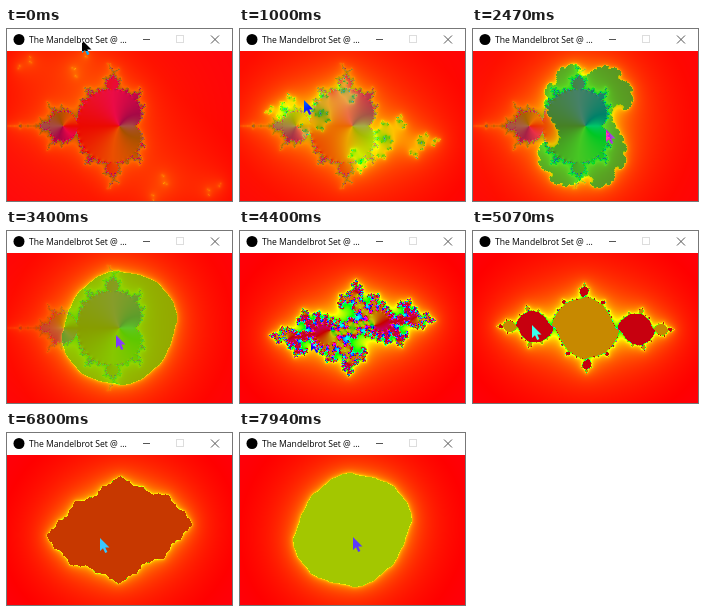
Write an HTML page with a canvas that moves like this. It is 227 px wide and 174 px high and loops after 8000 ms.

```html
<!DOCTYPE html>
<html lang="en">
<head>
<meta charset="utf-8">
<title>Mandelbrot and Julia explorer</title>
<style>
html, body { margin: 0; width: 100%; height: 100%; overflow: hidden; background: #fff; }
canvas { display: block; width: 100%; height: 100%; }
</style>
</head>
<body>
<canvas id="stage" width="227" height="174"></canvas>
<script>
const ctx = document.getElementById('stage').getContext('2d');
const LOOP = 8000, STEPS = 120, STEP = LOOP / STEPS;
const W = 225, H = 150, LEFT = 1, TOP = 23;
const SCALE = W / 4, LIMIT = 50;

// Pointer poses: time, place, and velocity in pixels per step
const POSES = [
  { t: -STEP, x: 90, y: -50, vx: 0, vy: 0 },
  { t: 0, x: 76, y: 12, vx: 0, vy: 25 },
  { t: 540, x: 66, y: 70, vx: 0, vy: 0 },
  { t: 870, x: 66, y: 70, vx: 0, vy: 0 },
  { t: 1670, x: 57, y: 101, vx: 0, vy: 0 },
  { t: 2470, x: 134, y: 101, vx: 1, vy: -3.5 },
  { t: 4400, x: 72, y: 108, vx: -0.5, vy: -4 },
  { t: 5870, x: 48, y: 106, vx: 0, vy: 0 },
  { t: 6800, x: 94, y: 106, vx: 1, vy: 0 },
  { t: 7940, x: 114, y: 105, vx: 2, vy: 0 }
];

const clamp01 = v => Math.max(0, Math.min(1, v));

// Cubic Hermite between neighbouring poses
function pointer(t) {
  let i = 0;
  while (i < POSES.length - 2 && t >= POSES[i + 1].t) i++;
  const a = POSES[i], b = POSES[i + 1], d = b.t - a.t;
  const u = clamp01((t - a.t) / d), ease = u * u * (3 - 2 * u);
  const blend = (p, q, vp, vq) =>
    p + (q - p) * ease + d / STEP * u * (1 - u) * (vp * (1 - u) - vq * u);
  return [blend(a.x, b.x, a.vx, b.vx), blend(a.y, b.y, a.vy, b.vy)];
}

function putHue(out, at, turn, value) {
  const h = (turn - Math.floor(turn)) * 6;
  for (let k = 0; k < 3; k++) {
    const d = (h + 5 - 2 * k) % 6;
    out[at + k] = 255 * value * (1 - clamp01(Math.min(d, 4 - d)));
  }
}

// Escaped points take their hue from the smooth count, the rest from the angle of z
function shade(out, at, x, y, cx, cy) {
  for (let n = 0; n <= LIMIT; n++) {
    const xx = x * x, yy = y * y;
    if (xx + yy > 256) {
      const mu = n - Math.log2(Math.log2(xx + yy) / 2);
      putHue(out, at, mu / LIMIT, 1);
      return;
    }
    if (n === LIMIT) break;
    y = 2 * x * y + cy;
    x = xx - yy + cx;
  }
  putHue(out, at, 0.5 - Math.atan2(y, x) / (2 * Math.PI), 0.78);
}

function render(out, c) {
  for (let j = 0, at = 0; j < H; j++) {
    const y = (j + 0.5 - H / 2) / SCALE;
    for (let i = 0; i < W; i++, at += 3) {
      const x = (i + 0.5 - W / 2) / SCALE;
      if (c) shade(out, at, x, y, c[0], c[1]);
      else shade(out, at, 0, 0, x, y);
    }
  }
}

const mandelbrot = new Float32Array(W * H * 3);
const julia = new Float32Array(W * H * 3);
const image = ctx.createImageData(W, H);
render(mandelbrot, null);

// The Julia constant trails the pointer by one step
function drawFractal(t) {
  const [px, py] = pointer(t - STEP);
  render(julia, [(px - LEFT - W / 2) / SCALE, (py - TOP - H / 2) / SCALE]);
  const mix = 0.65 + 0.35 * clamp01((t - 3200) / 500);
  for (let p = 0; p < W * H; p++) {
    for (let k = 0; k < 3; k++) {
      const s = p * 3 + k;
      image.data[p * 4 + k] = mandelbrot[s] + (julia[s] - mandelbrot[s]) * mix;
    }
    image.data[p * 4 + 3] = 255;
  }
  ctx.putImageData(image, LEFT, TOP);
}

function line(x1, y1, x2, y2) {
  ctx.beginPath();
  ctx.moveTo(x1, y1);
  ctx.lineTo(x2, y2);
  ctx.stroke();
}

function drawWindow() {
  ctx.fillStyle = '#777';
  ctx.fillRect(0, 0, 227, 174);
  ctx.fillStyle = '#fff';
  ctx.fillRect(1, 1, 225, 22);
  ctx.fillStyle = '#000';
  ctx.beginPath();
  ctx.arc(13, 11.5, 5.5, 0, 2 * Math.PI);
  ctx.fill();
  ctx.font = '8.6px "Open Sans", "Noto Sans", sans-serif';
  ctx.fillText('The Mandelbrot Set @ ...', 23, 15);
  ctx.lineWidth = 1;
  ctx.strokeStyle = '#555';
  line(137, 11.5, 144, 11.5);
  line(205, 7.5, 213, 15.5);
  line(213, 7.5, 205, 15.5);
  ctx.strokeStyle = '#ddd';
  ctx.strokeRect(170.5, 7.5, 7, 7);
}

// The pointer inverts whatever lies under it
const arrow = new Path2D('M0 0V13L3 10.3L5.2 15L7.4 14L5.3 9.5H9.5Z');

function drawPointer(t) {
  const [x, y] = pointer(t);
  ctx.save();
  ctx.translate(Math.round(x), Math.round(y));
  ctx.globalCompositeOperation = 'difference';
  ctx.fillStyle = '#fff';
  ctx.fill(arrow);
  ctx.restore();
}

let shown = -1;
const start = performance.now();

function tick() {
  const t = (performance.now() - start) % LOOP;
  const step = Math.floor(t / STEP + 0.05) % STEPS;
  if (step !== shown) {
    shown = step;
    drawWindow();
    drawFractal(step * STEP);
    drawPointer(step * STEP);
  }
  requestAnimationFrame(tick);
}
tick();
</script>
</body>
</html>
```
